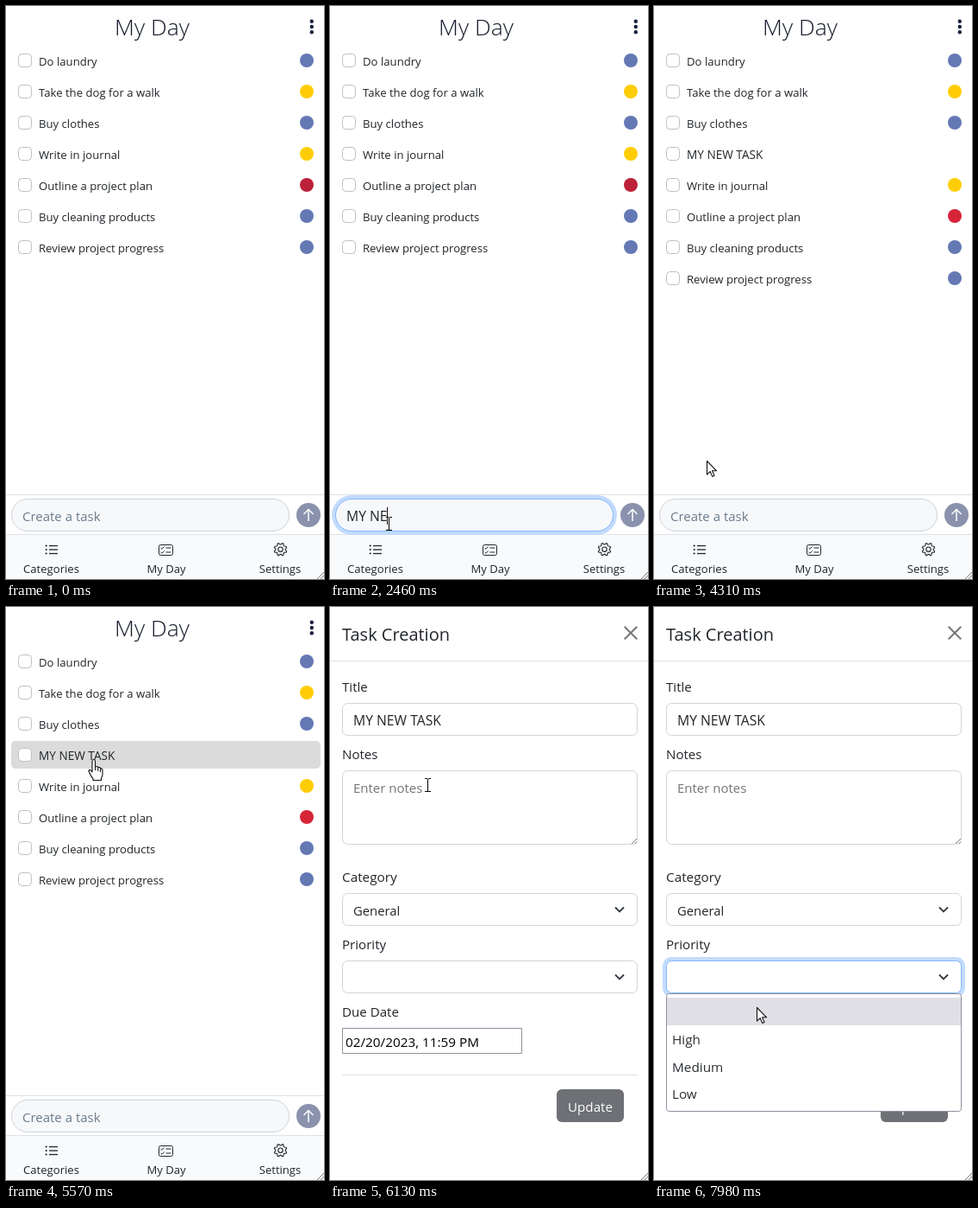
Recreate the animation shown at these times as an HTML page with a canvas. Size 369x663 px, loop 8000 ms.

```html
<!DOCTYPE html>
<html lang="en">
<head>
<meta charset="utf-8">
<title>My Day</title>
<style>
html, body { margin: 0; width: 100%; height: 100%; overflow: hidden; background: #fff; }
canvas { display: block; width: 369px; height: 663px; }
</style>
</head>
<body>
<canvas id="stage"></canvas>
<script>
const W = 369, H = 663, LOOP = 8000;
const canvas = document.getElementById('stage');
const dpr = window.devicePixelRatio || 1;
canvas.width = W * dpr;
canvas.height = H * dpr;
const c = canvas.getContext('2d');

const INK = '#212529', LINE = '#ced4da', RULE = '#dee2e6', TITLE = '#141a2a';
const BLUE = '#6478b4', YELLOW = '#ffcd05', RED = '#bc2139', RED2 = '#d62539';
const FONT = '"Open Sans", "Noto Sans", sans-serif';
const TASK = 'MY NEW TASK';

const TASKS = [
  ['Do laundry', BLUE], ['Take the dog for a walk', YELLOW], ['Buy clothes', BLUE],
  ['Write in journal', YELLOW], ['Outline a project plan', RED],
  ['Buy cleaning products', BLUE], ['Review project progress', BLUE]
];
const KEYS = [2000, 2090, 2190, 2290, 2460, 2530, 2600, 2690, 2790, 2860, 2920];
const SLIDE = [5510, 5570, 5640, 5710, 5780, 5840, 5910, 5970, 6060];

// start, end, steps, control point, end point
const MOVES = [
  [990, 1375, 6, 50, 625, 68, 599],
  [4310, 4780, 7, 38, 334, 103, 186],
  [4980, 5110, 3, 102, 180, 102, 177],
  [6060, 6260, 4, 113, 205, 125, 235],
  [6320, 6650, 5, 135, 310, 147, 384],
  [6980, 7290, 5, 140, 410, 132, 434],
  [7980, 7980, 1, 125, 450, 119, 463]
];

const clamp = (v, a = 0, b = 1) => Math.min(b, Math.max(a, v));

function stepped(t, t0, t1, n) {
  const gap = (t1 - t0) / (n - 1 || 1) || 1;
  return clamp(Math.floor((t - t0) / gap + 1e-6) + 1, 0, n) / n;
}

// cubic-bezier(.42, 0, .58, 1)
function easeInOut(x) {
  if (x <= 0 || x >= 1) return clamp(x);
  let lo = 0, hi = 1;
  for (let i = 0; i < 24; i++) {
    const u = (lo + hi) / 2, v = 1 - u;
    if (1.26 * v * v * u + 1.74 * v * u * u + u * u * u < x) lo = u; else hi = u;
  }
  return lo * lo * (3 - 2 * lo);
}

function text(s, x, y, size = 15.1, color = INK, align = 'left', weight = 400) {
  c.font = `${weight} ${size}px ${FONT}`;
  c.textAlign = align;
  c.fillStyle = color;
  c.fillText(s, x, y);
}

function rect(x, y, w, h, color) {
  c.fillStyle = color;
  c.fillRect(x, y, w, h);
}

function box(x, y, w, h, r, fill, stroke) {
  const d = stroke ? .5 : 0;
  c.beginPath();
  c.roundRect(x + d, y + d, w - 2 * d, h - 2 * d, r);
  if (fill) { c.fillStyle = fill; c.fill(); }
  if (stroke) { c.strokeStyle = stroke; c.lineWidth = 1; c.stroke(); }
}

function dot(x, y, r, color) {
  c.beginPath();
  c.arc(x, y, r, 0, 7);
  c.fillStyle = color;
  c.fill();
}

function path(points, color, width) {
  c.beginPath();
  points.forEach(([x, y], i) => i ? c.lineTo(x, y) : c.moveTo(x, y));
  c.strokeStyle = color;
  c.lineWidth = width;
  c.stroke();
}

function field(x, y, w, h, r, fill, focus) {
  if (focus > 0) {
    c.globalAlpha = focus;
    box(x - 4, y - 4, w + 8, h + 8, r + 4, '#c2dbfe');
    c.globalAlpha = 1;
  }
  box(x, y, w, h, r, fill, focus > .5 ? '#86b7fe' : LINE);
}

function grip(x, y, n) {
  for (let i = 0; i < 2; i++) path([[x - n + i * 4, y], [x, y - n + i * 4]], '#7c7c7c', 1);
}

function chevron(x, y) {
  path([[x - 5, y - 2.5], [x, y + 2.5], [x + 5, y - 2.5]], '#343a40', 1.8);
}

function drawTasks(t) {
  const added = t >= 3390;
  const rows = added
    ? [...TASKS.slice(0, 3), [TASK, null], ...TASKS.slice(3)]
    : TASKS;
  rows.forEach(([name, color], i) => {
    const y = 63 + 36 * i;
    const pressed = name === TASK && t >= 5510 && t < 5780;
    if (pressed) box(6, y - 16, 359, 32, 5, '#dbdbdb');
    box(14, y - 8, 16, 16, 4, '#fff', '#bfbfbf');
    text(name, 38, y + 6, name === TASK ? 13.6 : 13.15);
    if (color) dot(349, y, 8, added && color === RED ? RED2 : color);
  });
}

function drawNav() {
  rect(0, 611, W, 52, '#f8fafc');
  rect(0, 611, W, 1, RULE);
  for (const y of [624.5, 629, 633.5]) {
    rect(50, y - .6, 10, 1.3, INK);
    dot(46.7, y, 1.1, INK);
  }
  box(177, 623, 17, 13, 2, null, INK);
  for (const y of [627, 632]) {
    path([[179.5, y], [181, y + 1.3], [183.5, y - 1.5]], INK, 1);
    rect(185.5, y - .5, 6, 1, INK);
  }
  c.beginPath();
  for (let i = 0; i < 32; i++) {
    const a = (i + .5) * Math.PI / 16, r = i % 4 === 1 || i % 4 === 2 ? 7.4 : 5.7;
    c.lineTo(318.5 + r * Math.cos(a), 628.7 + r * Math.sin(a));
  }
  c.closePath();
  c.strokeStyle = INK;
  c.lineWidth = 1.1;
  c.stroke();
  c.beginPath();
  c.arc(318.5, 628.7, 2.7, 0, 7);
  c.stroke();
  text('Categories', 52.5, 656, 13.1, INK, 'center');
  text('My Day', 186, 656, 13.1, INK, 'center');
  text('Settings', 318, 656, 13.1, INK, 'center');
}

function drawEntry(t) {
  let focus = 0;
  if (t >= 1375 && t < 3390) focus = clamp((Math.floor((t - 1375) / 77) + 1) / 3);
  else if (t >= 3390 && t < 3520) focus = t < 3455 ? .7 : .3;
  rect(0, 565, W, 1, RULE);
  field(6, 570, 323, 38, 19, '#f6f8fa', focus);
  const typed = t < 3390 ? TASK.slice(0, KEYS.filter(k => t >= k).length) : '';
  if (typed) text(typed, 19, 596, 15.7);
  else text('Create a task', 19, 596, 15, '#6b7b8d');
  if (t >= 1450 && t < 3190) {
    c.font = `400 15.7px ${FONT}`;
    rect(Math.round(19 + c.measureText(typed).width) - (typed ? 1 : 0), 580, 1, 20, '#111');
  }
  dot(351, 589, 14, '#8a92ad');
  path([[351, 596], [351, 582.5]], '#fff', 1.5);
  path([[345.5, 588], [351, 582.5], [356.5, 588]], '#fff', 1.5);
}

function drawPage(t) {
  rect(0, 0, W, H, '#fff');
  text('My Day', 169.5, 34, 26.5, TITLE, 'center', 300);
  for (const y of [17.7, 24, 30.3]) dot(354.8, y, 2.2, '#17213c');
  drawTasks(t);
  drawNav();
  drawEntry(t);
}

function drawForm(t) {
  rect(0, 0, W, H, '#fff');
  text('Task Creation', 14, 39, 20);
  path([[341.7, 22.7], [356.3, 37.3]], '#777', 2);
  path([[356.3, 22.7], [341.7, 37.3]], '#777', 2);
  rect(0, 62, W, 1, RULE);

  text('Title', 14, 98);
  field(14, 111, 343, 38, 6, '#fff', 0);
  text(TASK, 27, 137, 15.7);
  text('Notes', 14, 176);
  field(14, 189, 343, 86, 6, '#fff', 0);
  text('Enter notes', 27, 215, 15, '#757575');
  grip(356, 274, 6);

  text('Category', 14, 318, 15.3);
  field(14, 331, 343, 38, 6, '#fff', 0);
  text('General', 27, 357, 14.8);
  chevron(336, 350);
  text('Priority', 14, 396);
  field(14, 409, 343, 38, 6, '#fff', t >= 7370 ? (t < 7450 ? .6 : 1) : 0);
  chevron(336, 428);

  text('Due Date', 14, 474);
  box(14, 487, 209, 30, 0, '#fff', '#8f8f9d');
  text('02/20/2023, 11:59 PM', 18, 509, 15.3, '#000');
  rect(14, 541, 343, 1, RULE);
  box(263, 558, 78, 38, 6, '#6e7075');
  text('Update', 302, 584, 15.2, '#fff', 'center');

  if (t >= 7450) {
    box(14, 447, 343, 137, 3, '#fff', '#8f8f9d');
    rect(15, 452, 341, 32, '#e0dfe6');
    ['High', 'Medium', 'Low'].forEach((s, i) => text(s, 21, 506 + 31.7 * i, 15.3, '#2b2f33'));
  }
}

function slideAt(t) {
  let s = t;
  if (t < 6060) for (const k of SLIDE) if (t >= k) s = k;
  return { y: Math.round(H * (easeInOut((s - 5718) / 300) - 1)), shade: .87 * clamp((s - 5680) / 150) };
}

function pointerAt(t) {
  let x = 40, y = 662;
  for (const [t0, t1, n, cx, cy, ex, ey] of MOVES) {
    if (t < t0) break;
    const p = stepped(t, t0, t1, n), q = 1 - p;
    x = q * q * x + 2 * p * q * cx + p * p * ex;
    y = q * q * y + 2 * p * q * cy + p * p * ey;
  }
  return [Math.round(x), Math.round(y)];
}

function pointerKind(y, off) {
  if (y < H + off) {
    const v = y - off;
    return (v > 189 && v < 275) || (v > 111 && v < 149) ? 'beam' : 'arrow';
  }
  if (y >= 570 && y < 608) return 'beam';
  return y >= 615 || (y > 47 && y < 331) ? 'hand' : 'arrow';
}

const SHAPES = {
  arrow: new Path2D('M.5 .5V16.2L4.2 12.7L6.7 18.4L9 17.4L6.6 11.8H11.6Z'),
  hand: new Path2D('M-2 14V1.5Q-2 -.5 -.3 -.5T1.5 1.5V8Q4 6.6 4.8 8.8Q7 7.8 7.6 10Q10 9.4 10 12V17' +
    'Q10 19 8.5 21V23.5H-1V21.5Q-3.5 19 -5.8 13.5Q-6.3 11.2 -4.4 11.4Q-3 12 -2 14Z')
};

function drawPointer(t, off) {
  const [x, y] = pointerAt(t), kind = pointerKind(y, off);
  c.save();
  c.translate(x, y);
  if (kind === 'beam') {
    rect(0, -7, 1, 15, '#000');
    for (const v of [-8, 7]) {
      rect(-3, v, 3, 1, '#000');
      rect(1, v, 3, 1, '#000');
    }
  } else {
    c.fillStyle = '#fff';
    c.fill(SHAPES[kind]);
    c.strokeStyle = '#111';
    c.lineWidth = 1.1;
    c.lineJoin = 'round';
    c.stroke(SHAPES[kind]);
    if (kind === 'hand') for (const [u, v] of [[1.5, 8], [4.8, 9], [7.6, 10]]) path([[u, v], [u, v + 4]], '#111', 1);
  }
  c.restore();
}

function draw(t) {
  c.setTransform(dpr, 0, 0, dpr, 0, 0);
  const slide = slideAt(t);
  if (slide.y < 0) {
    drawPage(t);
    rect(0, 0, W, H, `rgba(0,0,0,${slide.shade})`);
  }
  if (slide.y > -H) {
    c.save();
    c.translate(0, slide.y);
    drawForm(t);
    c.restore();
  }
  grip(369, 663, 8);
  if (t >= 990) drawPointer(t, slide.y);
}

const start = performance.now();
function tick() {
  draw((performance.now() - start) % LOOP);
  requestAnimationFrame(tick);
}
tick();
</script>
</body>
</html>
```
